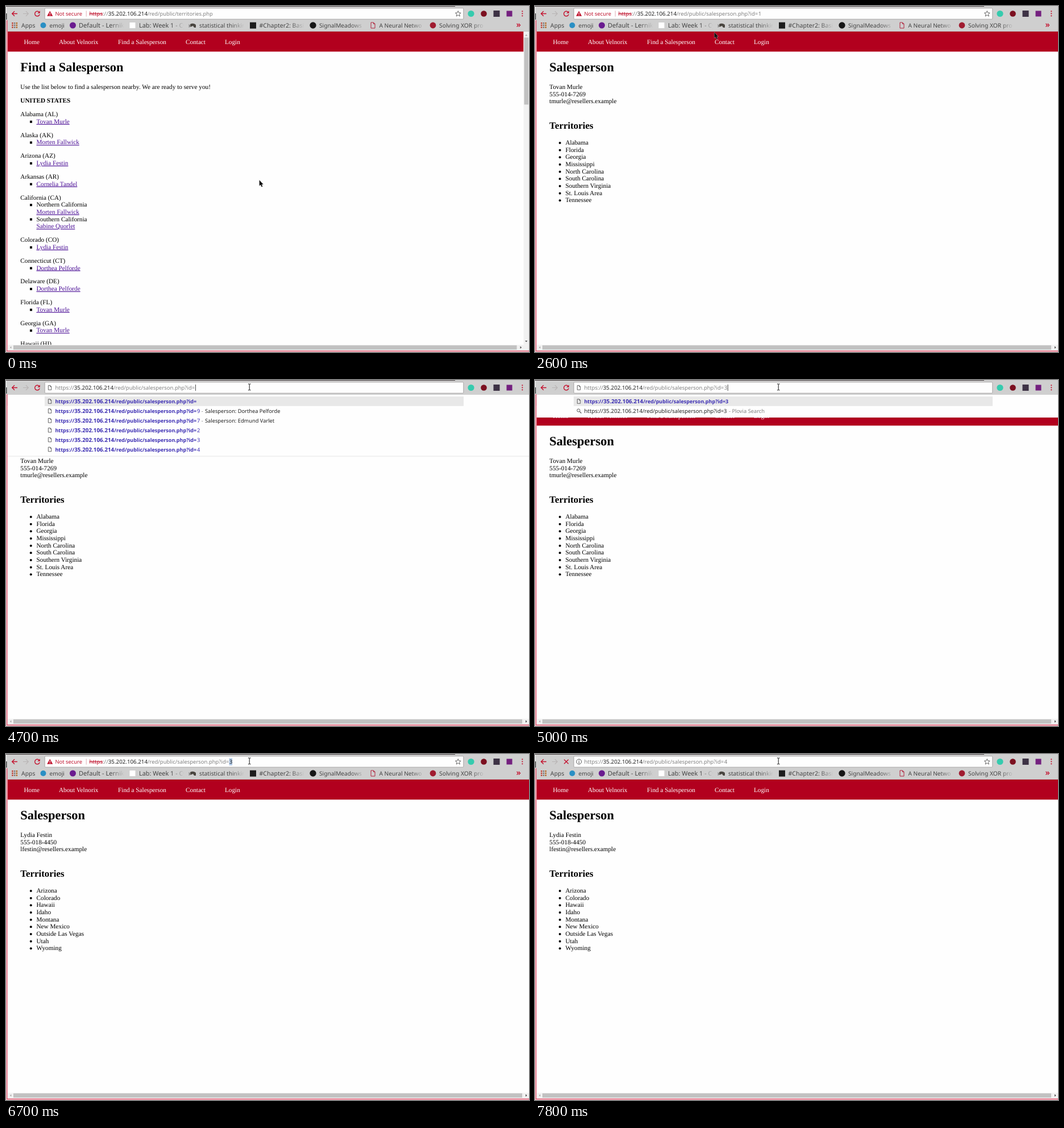
Animation of 920 by 609 pixels, one loop 8 s. Source, as an HTML page:

```html
<!DOCTYPE html>
<html lang="en">
<head>
<meta charset="utf-8">
<title>Find a Salesperson</title>
<style>
  html, body { margin: 0; width: 100%; height: 100%; overflow: hidden; background: #fefefe; }
  svg { display: block; width: 920px; height: 609px; }
  text { font-family: "Noto Sans", "Open Sans", sans-serif; text-rendering: geometricPrecision; fill: #222; }
  .page text { font-family: "Liberation Serif", "Times New Roman", serif; font-size: 11.26px; fill: #000; }
  .page .nav { fill: #fff; }
  .page .link { fill: #4b0f96; text-decoration: underline; }
  .page .h1 { font-size: 22.5px; font-weight: 700; }
  .page .h2 { font-size: 16.9px; font-weight: 700; }
  .bold { font-weight: 700; }
  .mark { fill: #444; }
  .grey { fill: #828282; }
  .warn { fill: #c0152f; }
  .struck { fill: #c0152f; text-decoration: line-through; }
  .hit { fill: #3b2db3; }
  .line { fill: none; stroke: #c4122f; stroke-width: 1.4; }
</style>
</head>
<body>
<svg viewBox="0 0 920 609">
  <defs>
    <linearGradient id="fade"><stop offset="0" stop-color="#cfcfcf" stop-opacity="0"/><stop offset=".75" stop-color="#cfcfcf"/></linearGradient>
    <linearGradient id="shade" x2="0" y2="1"><stop offset="0" stop-color="#000" stop-opacity=".1"/><stop offset="1" stop-color="#000" stop-opacity="0"/></linearGradient>
    <clipPath id="view"><rect x="3" y="44" width="917" height="552.5"/></clipPath>
    <path id="doc" d="M-2.6-3.8H.8L2.8-1.8V3.8H-2.6ZM.8-3.8V-1.8H2.8" fill="none" stroke="#555" stroke-width=".9"/>
  </defs>
  <rect width="920" height="609" fill="#fefefe"/>
  <g id="page" class="page" clip-path="url(#view)"></g>
  <g id="scroll"></g>
  <g id="chrome"></g>
  <g id="drop"></g>
  <g id="tools"></g>
  <g id="box"></g>
  <path d="M0 25H1V609H0Z" fill="#f3dde0"/>
  <path d="M1 25H2.5V606.5H920V608.3H1Z" fill="#e05c74"/>
  <g id="status"></g>
  <g id="cursor"></g>
</svg>
<script>
const $ = id => document.getElementById(id);
const txt = (x, y, s, cls = '', size = 0) =>
  `<text x="${x}" y="${y}" class="${cls}"${size ? ` font-size="${size}"` : ''}>${s}</text>`;
const rect = (x, y, w, h, fill, more = '') =>
  `<rect x="${x}" y="${y}" width="${w}" height="${h}" fill="${fill}" ${more}/>`;
const disc = (x, y, r, fill) => `<circle cx="${x}" cy="${y}" r="${r}" fill="${fill}"/>`;
const path = (d, more) => `<path d="${d}" ${more}/>`;
const doc = y => `<use href="#doc" x="77" y="${y}"/>`;

const HOST = '35.202.106.214', PERSON = '/red/public/salesperson.php?id=';
const LINE = 12.67;
const [TOVAN, MORTEN, LYDIA, CORNELIA, SABINE, DORTHEA] = ['Tovan Murle', 'Morten Fallwick',
  'Lydia Festin', 'Cornelia Tandel', 'Sabine Quorlet', 'Dorthea Pelforde'];

const people = {
  1: { name: TOVAN, phone: '555-014-7269', mail: 'tmurle@resellers.example',
    areas: ['Alabama', 'Florida', 'Georgia', 'Mississippi', 'North Carolina', 'South Carolina',
      'Southern Virginia', 'St. Louis Area', 'Tennessee'] },
  3: { name: LYDIA, phone: '555-018-4450', mail: 'lfestin@resellers.example',
    areas: ['Arizona', 'Colorado', 'Hawaii', 'Idaho', 'Montana', 'New Mexico',
      'Outside Las Vegas', 'Utah', 'Wyoming'] }
};
const states = [['Alabama (AL)', TOVAN], ['Alaska (AK)', MORTEN], ['Arizona (AZ)', LYDIA],
  ['Arkansas (AR)', CORNELIA], ['California (CA)'], ['Colorado (CO)', LYDIA],
  ['Connecticut (CT)', DORTHEA], ['Delaware (DE)', DORTHEA], ['Florida (FL)', TOVAN],
  ['Georgia (GA)', TOVAN], ['Hawaii (HI)', LYDIA]];

function nav(right) {
  const items = [[31.5, 'Home'], [93, 'About Velnorix'], [197, 'Find a Salesperson'], [316, 'Contact'], [385, 'Login']];
  return rect(2.5, 45, right - 2.5, 35.3, '#b2001e') + items.map(([x, s]) => txt(x, 67, s, 'nav')).join('');
}

function listPage() {
  let out = nav(910.5) + txt(25.3, 115.1, 'Find a Salesperson', 'h1') +
    txt(25.3, 146.1, 'Use the list below to find a salesperson nearby. We are ready to serve you!') +
    txt(25.3, 170.1, 'UNITED STATES', 'bold');
  let y = 194.1;
  const square = () => rect(42, y - 5, 4, 4, '#000');
  for (const [state, name] of states) {
    out += txt(25.3, y, state);
    y += LINE;
    if (name) {
      out += square() + txt(53.5, y, name, 'link');
    } else {
      out += square() + txt(53.5, y, 'Northern California');
      out += txt(53.5, y += LINE, MORTEN, 'link');
      y += LINE;
      out += square() + txt(53.5, y, 'Southern California');
      out += txt(53.5, y += LINE, SABINE, 'link');
    }
    y += 23.95;
  }
  return out;
}

function personPage({ name, phone, mail, areas }) {
  return nav(920) + txt(25.3, 115.1, 'Salesperson', 'h1') +
    [name, phone, mail].map((s, i) => txt(25.3, 146.1 + i * LINE, s)).join('') +
    txt(25.3, 216.1, 'Territories', 'h2') +
    areas.map((s, i) => disc(43.8, 241 + i * LINE, 2, '#000') + txt(53.5, 244.1 + i * LINE, s)).join('');
}

function scrollbars(tall) {
  const end = tall ? 910.5 : 920;
  let out = rect(3, 596.5, 917, 10, '#f1f1f1') + rect(13, 597.3, end - 25, 7.5, '#c1c1c1') +
    path('M9.3 599V603L7 601Z', 'fill="#a3a3a3"') +
    path(`M${end - 6} 598.8V603.2L${end - 3.4} 601Z`, 'fill="#505050"');
  if (tall) out += rect(910.5, 45, 9.5, 551.5, '#f1f1f1') + rect(911.5, 55.5, 7.5, 118, '#c1c1c1') +
    path('M913 52.5H917.4L915.2 50Z', 'fill="#a3a3a3"') + path('M913 589H917.4L915.2 591.5Z', 'fill="#505050"');
  return out;
}

function bookmarks() {
  const marks = [['Default - Lernik', 128, 11.1], ['Lab: Week 1 - Cyb', 234, 10.9], ['statistical thinkin', 340, 10.25],
    ['#Chapter2: Basi', 445.5, 10.55], ['SignalMeadows', 551, 10.2], ['A Neural Netwo', 656.5, 10.15], ['Solving XOR pro', 762, 10.33]];
  let out = rect(1, 25, 919, 19.5, '#cfcfcf') + rect(1, 44, 919, .8, '#b9b4b4');
  for (let i = 0; i < 9; i++)
    out += rect(10.3 + i % 3 * 3.7, 29 + (i / 3 | 0) * 3.7, 2.4, 2.4, ['#c0392b', '#777', '#b5651d'][i % 3]);
  out += txt(27, 38, 'Apps', 'mark', 10.4) + disc(65.5, 34, 5, '#2a8fc4') + txt(76.5, 38, 'emoji', 'mark', 10.1);
  marks.forEach(([s, x, size], i) => {
    const end = 206 + 105.7 * i;
    out += txt(x, 38, s, 'mark', size) + rect(end - 22, 27, 32, 15, 'url(#fade)');
  });
  return out + disc(117.5, 34, 5.5, '#6a1b8f') + rect(217.5, 29, 10, 10, '#fff') +
    path('M324 37V32Q329 29 334 33V38H331L329 35Z', 'fill="#4a4640"') + rect(429, 28.7, 11, 11, '#1c1c1c') +
    disc(540, 34, 5.7, '#161616') +
    path('M642 29H646.5L649 31.5V39H642ZM646.5 29V31.5H649', 'fill="none" stroke="#b0233c"') +
    disc(751, 34, 5.4, '#a01c30') +
    path('M898.6 31L901.2 33.7L898.6 36.4M901.8 31L904.4 33.7L901.8 36.4', 'class="line"');
}

function toolbar(load) {
  const reload = load ? path('M51.2 9.7L58.8 17.3M58.8 9.7L51.2 17.3', 'class="line"')
    : path('M58.6 11.2A4.3 4.3 0 1 0 59.2 14.6', 'class="line"') + path('M59.8 8.4V12.8H55.4Z', 'fill="#c4122f"');
  return rect(1, 0, 919, 25.5, '#cfcfcf') + rect(0, 0, 790, 1, '#423b3c') +
    rect(0, 13, 1.6, 11, '#555') +
    path('M20 13.5H10.8M15 9.2L10.7 13.5L15 17.8', 'class="line"') +
    path('M30 13.5H39.2M35 9.2L39.3 13.5L35 17.8', 'fill="none" stroke="#b8b4b4" stroke-width="1.2"') + reload +
    disc(818, 13.5, 5.6, '#35cbae') + disc(840.5, 13.5, 5.3, '#7c1020') + rect(857.5, 8, 11, 11, '#3d3245') +
    rect(880.5, 8.5, 10, 10, '#74207f') + [9.3, 13.3, 17.3].map(y => disc(908.3, y, 1.1, '#c4122f')).join('');
}

function omnibox({ mode, id, sel }) {
  const x = mode === 'warn' ? 146.4 : 86.4;
  const tail = x + 246.4;
  let out = rect(68.2, 3.8, 736.6, 19.4, '#fefefe', 'rx="1.6" stroke="#a3a0a0" stroke-width=".9"');
  if (sel === 'all') out += rect(x, 7.3, id == null ? 218 : 252, 12.7, '#b5cdea');
  if (sel === 'digit') out += rect(tail - .3, 7.3, 5.6, 12.7, '#b5cdea');
  if (mode === 'warn') {
    out += path('M77.3 8.8L82.4 17.8H72.2Z', 'fill="#c0152f"') + rect(76.8, 11.8, 1.1, 3, '#fff') +
      rect(76.8, 15.6, 1.1, 1.1, '#fff') + txt(86.4, 17.2, 'Not secure', 'warn', 9.4) +
      rect(140.8, 8.5, .8, 10, '#d99aa5') + txt(x, 17.2, 'https', 'struck', 9.72) + txt(x + 23.6, 17.2, '://', 'grey', 9.72);
  } else {
    out += mode === 'edit' ? doc(13.5)
      : '<circle cx="77.3" cy="13.5" r="4.4" fill="none" stroke="#555"/>' + rect(76.8, 12.8, 1.1, 3.6, '#555') + rect(76.8, 10.8, 1.1, 1.2, '#555');
    out += txt(x, 17.2, 'https://', 'grey', 9.72);
  }
  out += txt(x + 33.4, 17.2, HOST, '', 9.75);
  out += id == null ? txt(x + 102.6, 17.2, '/red/public/territories.php', 'grey', 9.31)
    : txt(x + 102.6, 17.2, PERSON, 'grey', 9.45) + txt(tail, 17.2, id, sel ? '' : 'grey', 9.7);
  if (mode === 'edit') out += rect(tail + (id ? 6 : .2), 8, .8, 11, '#222');
  else out += path('M795.3 8.6L796.7 11.9L800.2 12.2L797.5 14.5L798.4 18L795.3 16.1L792.2 18L793.1 14.5L790.4 12.2L793.9 11.9Z',
    'fill="none" stroke="#555" stroke-width=".9"');
  return out;
}

const plainUrl = (y, digit) => txt(86.4, y, 'https://', '', 9.72) + txt(119.8, y, HOST, '', 9.75) +
  txt(189, y, PERSON + digit, '', 9.45);
const boldUrl = (y, digit) => txt(86.4, y, 'https://', 'hit bold', 9) + txt(120.2, y, HOST, 'hit bold', 9.8) +
  txt(190.3, y, PERSON + digit, 'hit bold', 9);

// rows: [digit, title]
function dropdown(rows, typed) {
  const h = rows.length * 16.9 + 6.3;
  let out = rect(2.5, 26, 917.5, h, '#fefefe') + rect(2.5, 26 + h, 917.5, 2, 'url(#shade)') + rect(68, 29, 737, 16.8, '#e8e8e8');
  rows.forEach(([digit, title], i) => {
    const y = 41 + i * 16.9;
    if (digit === 'search') {
      out += '<circle cx="76.5" cy="53.5" r="2.6" fill="none" stroke="#555"/>' + path('M78.4 55.4L81.5 58.5', 'stroke="#555" stroke-width="1.3"') +
        plainUrl(y, typed) + txt(341, y, '- Plovia Search', 'grey', 9.3);
      return;
    }
    const exact = typed && i === 0;
    out += doc(y - 3.5) + boldUrl(y, exact ? digit : '');
    if (!exact) out += txt(336, y, digit, 'hit', 9.4);
    if (title) out += txt(343.8, y, '-', 'grey', 9.3) + txt(350, y, 'Salesperson: ' + title, '', 9.27);
  });
  return out;
}

const status = () => rect(2.5, 589, 304.5, 18.5, '#f7f7f7', 'stroke="#cfcfcf" stroke-width=".8"') +
  txt(5, 601.2, 'https://' + HOST + PERSON + 1, 'grey', 10.27);

const older = [['9', DORTHEA], ['7', 'Edmund Varlet'], ['2']];
const before = [[''], ...older, ['3'], ['4']];
const after = [[''], ['3', LYDIA], ...older, ['4']];
const match = d => [[d], ['search']];

// Each step changes part of the state at its time in ms.
const steps = [
  [0, { page: 'list', mode: 'warn', id: null, sel: '', load: false, hover: false, rows: null }],
  [1200, { hover: true }],
  [1500, { load: true }],
  [2000, { page: 1, id: '1', hover: false, load: false }],
  [3500, { sel: 'all' }],
  [3700, { sel: 'digit' }],
  [4700, { mode: 'edit', id: '', sel: '', rows: before }],
  [4900, { id: '3', rows: match('3') }],
  [5300, { mode: 'info', rows: null, load: true }],
  [5500, { mode: 'warn', page: 3, load: false }],
  [6300, { sel: 'all' }],
  [6700, { sel: 'digit' }],
  [7400, { mode: 'edit', id: '', sel: '', rows: after }],
  [7600, { id: '4', rows: match('4') }],
  [7800, { mode: 'info', rows: null, load: true }]
];

const shapes = {
  arrow: path('M0 0V9.9L2.2 7.9L4 11.8L5.6 11L4 7.3H6.9Z', 'fill="#111" stroke="#ddd" stroke-width=".7" paint-order="stroke"'),
  hand: path('M0 0Q1.5-1 2.2 1L3 3.6L8 4.6Q9 5 8.6 7L8 10.2H2.3L-2.6 5.6Q-2.4 4.2 0 5.2Z', 'fill="#111" stroke="#fff" stroke-width=".6" paint-order="stroke" transform="translate(-.6 0)"'),
  beam: path('M-2.3-5.4H-.7L0-4.8L.7-5.4H2.3M0-4.8V4.8M-2.3 5.4H-.7L0 4.8L.7 5.4H2.3', 'fill="none" stroke="#111"')
};
const glide = (k, x0, y0, x1, y1) => {
  const e = k * k * (3 - 2 * k);
  return [x0 + (x1 - x0) * e, y0 + (y1 - y0) * e];
};
function pointer(t) {
  if (t < 400) return ['arrow', 445.7, 306.6];
  if (t < 1200) return ['arrow', ...glide(Math.min(1, (t - 300) / 700), 445.7, 306.6, 102.5, 210.5)];
  if (t < 2000) return ['hand', 95, 207];
  if (t < 2900) return ['arrow', ...glide((t - 1900) / 900, 97, 208, 347, 23)];
  if (t < 3100) return ['beam', 433, 8];
  if (t < 3300) return ['beam', t < 3200 ? 401 : 416, 12];
  return ['beam', 428.2, 12.4];
}

$('chrome').innerHTML = bookmarks();
let shown = -1, pageShown;
function draw(t) {
  const [shape, x, y] = pointer(t);
  $('cursor').innerHTML = `<g transform="translate(${x} ${y})">${shapes[shape]}</g>`;
  const n = steps.filter(s => s[0] <= t).length;
  if (n === shown) return;
  shown = n;
  const s = Object.assign({}, ...steps.slice(0, n).map(p => p[1]));
  if (s.page !== pageShown) {
    pageShown = s.page;
    const list = s.page === 'list';
    $('page').innerHTML = list ? listPage() : personPage(people[s.page]);
    $('scroll').innerHTML = scrollbars(list);
  }
  $('drop').innerHTML = s.rows ? dropdown(s.rows, s.id) : '';
  $('tools').innerHTML = toolbar(s.load);
  $('box').innerHTML = omnibox(s);
  $('status').innerHTML = s.hover ? status() : '';
}

const start = performance.now();
let last = -1;
function tick() {
  const t = Math.floor((performance.now() - start) % 8000 / 100) * 100;
  if (t !== last) draw(last = t);
  requestAnimationFrame(tick);
}
tick();
</script>
</body>
</html>
```
